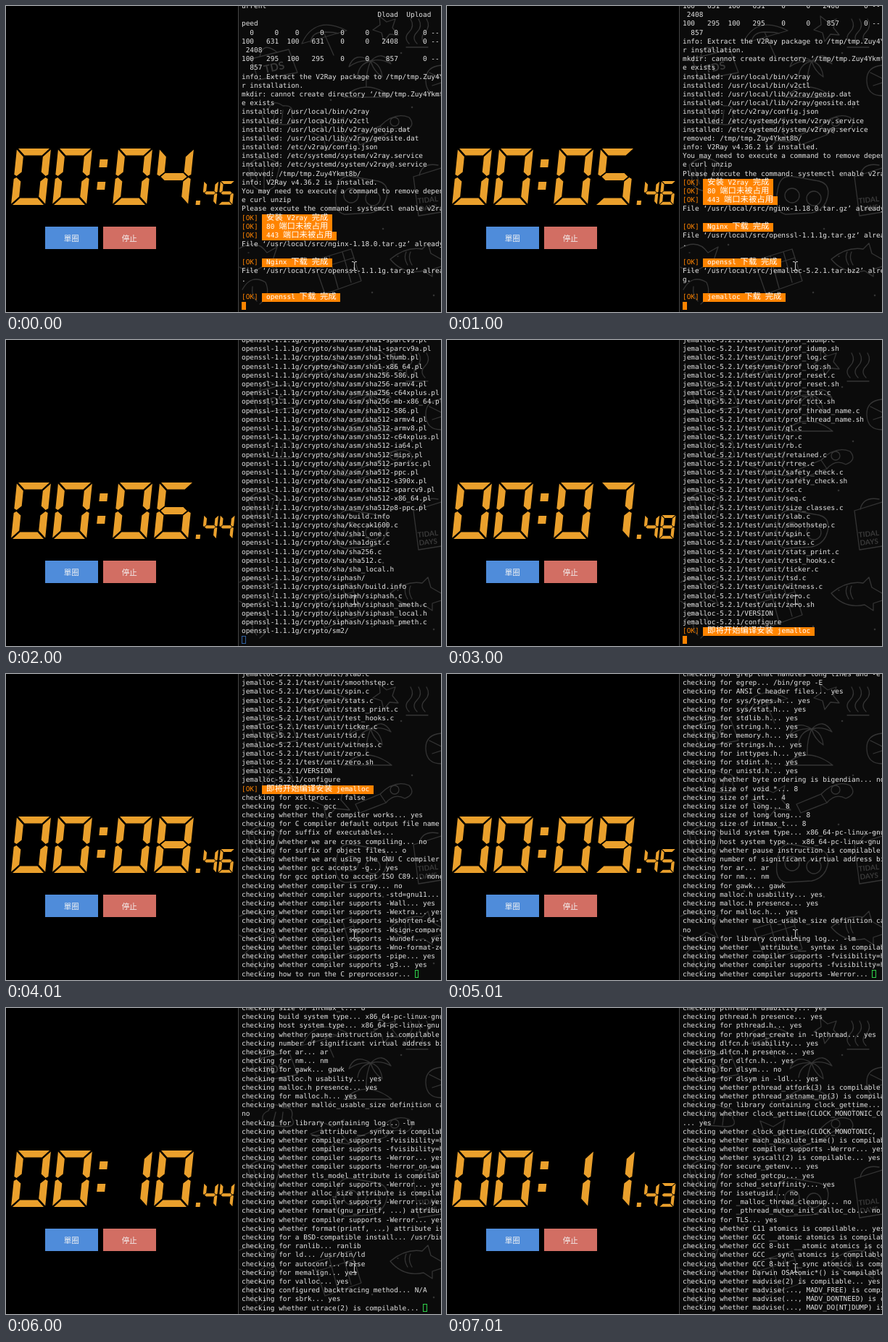
These frames come from a looping animation (600x423 px, 8 s). An HTML page:

```html
<!DOCTYPE html>
<html lang="zh">
<head>
<meta charset="utf-8">
<title>Stopwatch and terminal</title>
<style>
html, body { margin: 0; width: 100%; height: 100%; overflow: hidden; background: #000; }
svg { position: absolute; left: 0; top: 0; }
button {
  position: absolute; top: 305px; width: 73.5px; height: 31px; padding: 0; border: 0;
  color: #f4f4f4; font: 10.5px "Noto Sans CJK TC", "Noto Sans CJK", sans-serif;
}
#lap { left: 53.5px; background: #4f8cda; }
#stop { left: 133.5px; background: #d26e63; }
pre {
  position: absolute; left: 325px; top: -4.9px; margin: 0; width: 275px; height: 428px; overflow: hidden;
  color: #e4e4e4; font: 9.45px/12.18px "DejaVu Sans Mono", monospace;
  text-rendering: geometricPrecision; font-variant-ligatures: none;
}
pre em { color: #ff8400; font-style: normal; }
pre b { display: inline-block; height: 12.18px; background: #ff8400; color: #fff; font-weight: 400; }
pre i { font: 11.38px/0 "Noto Sans CJK SC", "Noto Sans CJK", sans-serif; }
pre u { display: inline-block; box-sizing: border-box; width: 5.7px; height: 11px; border: 1px solid; vertical-align: -2px; }
</style>
</head>
<body>
<svg width="600" height="423">
  <path fill="#0b0b0b" d="M321 0h279v423H321z"/>
  <path stroke="#444" d="M320.5 0v423"/>
  <g id="doodles" fill="none" stroke="#343434" stroke-width="1.3" stroke-linejoin="round" stroke-linecap="round">
    <!-- bag, palm island, steam, coconut -->
    <path d="M338 73l52-13 12 32-54 10zM350 70q4-22 24-6"/>
    <path d="M466 126q30-28 66 0zM497 112q-1-20 6-36M503 76q-22-14-30 8 14-10 30-8 16-16 28 4-14-8-28-4 14 4 16 22-12-8-16-22-16 4-18 20"/>
    <path d="M556 52q-8-8 0-16t2-18M567 52q-8-8 0-16t2-18M578 52q-8-8 0-16t2-18M552 57h30"/>
    <path d="M600 82q-22 2-21 22t21 20M584 92l16 8M588 110l12-4"/>
    <!-- umbrella, shell, snorkel -->
    <path d="M408 52q18-40 62-18zM438 36l14 32M420 50q2-14 18-14t20 2"/>
    <path d="M358 162q-10-14 4-20 6-14 20-4 16-2 12 14 8 12-10 12zM368 160l4-16M380 162l2-18"/>
    <path d="M482 180l34-14 8 12-36 14zM516 166q20-20 40-12 10 12-6 18-14-8-26 6M530 160a6 6 0 1 0 12 0a6 6 0 1 0-12 0"/>
    <path d="M432 156l18 8 16-10-4 20 12 14-20-2-12 14-4-18-18-8 16-6z"/>
    <!-- goggles, sign, cooler -->
    <path d="M457 250q4-18 22-14l34 6q16 4 12 22t-22 22l-36 2q-18-4-10-38zM466 262a10 10 0 1 0 20 0a10 10 0 1 0-20 0M496 266a10 10 0 1 0 20 0a10 10 0 1 0-20 0"/>
    <path d="M562 236l38-12M562 236l7 54 31-5M570 234q4-18 26-14"/>
    <path d="M424 352l52-16 14 44-50 18zM428 364l52-16M446 346l12 44M464 340l12 42"/>
    <!-- sharks and fish -->
    <path d="M530 350q22-18 44-14l8-8 4 14 14 8M530 350q18 22 46 16l12 8v-10l12-4M540 346h1M552 340q-4 8 2 18M558 340q-4 8 2 18"/>
    <path d="M322 335q24-14 38 6l14-8-6 18 6 14-16-8q-18 16-36 4M334 341h1"/>
    <path d="M326 392q12-22 32-10 8 18-8 30M340 388q-2 12 6 20"/>
    <path d="M334 220q20-20 44 0l-8 30q-16 12-30-2zM342 224l6 22M356 218v34M369 222l-6 24"/>
    <path d="M515 14l10 8 12-4-4 12 8 10-12-1-8 10-3-12-12-4 10-7z"/>
    <path stroke-width="2.5" d="M410 98h.1M448 130h.1M545 65h.1M560 140h.1M402 208h.1M540 208h.1M410 300h.1M520 308h.1M505 396h.1M388 330h.1M590 400h.1M340 128h.1"/>
    <g fill="#3a3a3a" stroke="none" font-family="Lato, sans-serif" font-weight="700">
      <text font-size="15" transform="translate(357 93) rotate(-13)">TDS</text>
      <text font-size="10" transform="translate(568 273) rotate(-6)">TIDAL</text>
      <text font-size="10" transform="translate(570 284) rotate(-6)">DAYS</text>
    </g>
  </g>
  <path id="clock" fill="#eaa02c"/>
</svg>
<button id="lap">單圈</button>
<button id="stop">停止</button>
<pre id="term"></pre>
<svg width="600" height="423"><path fill="none" stroke="#ccc" d="M477 353.500h2l1.500 1 1.500-1h2M480.500 354v11M477 365.500h2l1.500-1 1.500 1h2"/></svg>
<script>
const starts = [0, 1000, 2000, 3000, 4010, 5010, 6000, 7010], loop = 8000;
const readings = ['000445', '000546', '000644', '000748', '000846', '000945', '001044', '001143'];

// Terminal: a growing log, of which each screen shows the last rows.
const log = [], screens = [];
const cursor = (color, fill = 'none') => `<u style="border-color:${color};background:${fill}"></u>`;
const block = cursor('#ff8400', '#ff8400'), green = cursor('#2fd04a');
const add = text => log.push(...text.replaceAll('~', 'checking ').split('\n'));
const files = (prefix, names) => log.push(...names.split(' ').map(n => prefix + n));
const ok = text => add(`<em>[OK]</em> <b> ${text.replace(/[\u4e00-\u9fff]+/g, '<i>$&</i>')} </b>`);
const show = last => screens.push([...log.slice(-34), last.replace('~', 'checking ')].join('\n'));

add(`urrent
                                 Dload  Upload
peed
  0     0    0     0    0     0      0      0 --
100   631  100   631    0     0   2408      0 --
 2408
100   295  100   295    0     0    857      0 --
  857
info: Extract the V2Ray package to /tmp/tmp.Zuy4Ykmt8b
r installation.
mkdir: cannot create directory ‘/tmp/tmp.Zuy4Ykmt8b
e exists
installed: /usr/local/bin/v2ray
installed: /usr/local/bin/v2ctl
installed: /usr/local/lib/v2ray/geoip.dat
installed: /usr/local/lib/v2ray/geosite.dat
installed: /etc/v2ray/config.json
installed: /etc/systemd/system/v2ray.service
installed: /etc/systemd/system/v2ray@.service
removed: /tmp/tmp.Zuy4Ykmt8b/
info: V2Ray v4.36.2 is installed.
You may need to execute a command to remove dependent
e curl unzip
Please execute the command: systemctl enable v2ray`);
ok('安装 V2ray 完成');
ok('80 端口未被占用');
ok('443 端口未被占用');
add('File ‘/usr/local/src/nginx-1.18.0.tar.gz’ already\n');
ok('Nginx 下载 完成');
add('File ‘/usr/local/src/openssl-1.1.1g.tar.gz’ already\n.\n');
ok('openssl 下载 完成');
show(block);

add('File ‘/usr/local/src/jemalloc-5.2.1.tar.bz2’ already\ng.\n');
ok('jemalloc 下载 完成');
show(block);

const crypto = 'openssl-1.1.1g/crypto/';
files(crypto + 'sha/asm/sha', '1-sparcv9.pl 1-sparcv9a.pl 1-thumb.pl 1-x86_64.pl 256-586.pl 256-armv4.pl 256-c64xplus.pl 256-mb-x86_64.pl 512-586.pl 512-armv4.pl 512-armv8.pl 512-c64xplus.pl 512-ia64.pl 512-mips.pl 512-parisc.pl 512-ppc.pl 512-s390x.pl 512-sparcv9.pl 512-x86_64.pl 512p8-ppc.pl');
files(crypto + 'sha/', 'build.info keccak1600.c sha1_one.c sha1dgst.c sha256.c sha512.c sha_local.h');
files(crypto + 'siphash/', ' build.info siphash.c siphash_ameth.c siphash_local.h siphash_pmeth.c');
add(crypto + 'sm2/');
show(cursor('#2f5f9f'));

const jemalloc = 'jemalloc-5.2.1/';
files(jemalloc + 'test/unit/', 'prof_idump.c prof_idump.sh prof_log.c prof_log.sh prof_reset.c prof_reset.sh prof_tctx.c prof_tctx.sh prof_thread_name.c prof_thread_name.sh ql.c qr.c rb.c retained.c rtree.c safety_check.c safety_check.sh sc.c seq.c size_classes.c slab.c smoothstep.c spin.c stats.c stats_print.c test_hooks.c ticker.c tsd.c witness.c zero.c zero.sh');
files(jemalloc, 'VERSION configure');
ok('即将开始编译安装 jemalloc');
show(block);

add(`~for xsltproc... false
~for gcc... gcc
~whether the C compiler works... yes
~for C compiler default output file name... a.out
~for suffix of executables... 
~whether we are cross compiling... no
~for suffix of object files... o
~whether we are using the GNU C compiler... yes
~whether gcc accepts -g... yes
~for gcc option to accept ISO C89... none needed
~whether compiler is cray... no
~whether compiler supports -std=gnu11... yes
~whether compiler supports -Wall... yes
~whether compiler supports -Wextra... yes
~whether compiler supports -Wshorten-64-to-32... no
~whether compiler supports -Wsign-compare... yes
~whether compiler supports -Wundef... yes
~whether compiler supports -Wno-format-zero-length
~whether compiler supports -pipe... yes
~whether compiler supports -g3... yes`);
show('~how to run the C preprocessor... ' + green);

add(`~for grep that handles long lines and -e... /bin
~for egrep... /bin/grep -E
~for ANSI C header files... yes
~for sys/types.h... yes
~for sys/stat.h... yes
~for stdlib.h... yes
~for string.h... yes
~for memory.h... yes
~for strings.h... yes
~for inttypes.h... yes
~for stdint.h... yes
~for unistd.h... yes
~whether byte ordering is bigendian... no
~size of void *... 8
~size of int... 4
~size of long... 8
~size of long long... 8
~size of intmax_t... 8
~build system type... x86_64-pc-linux-gnu
~host system type... x86_64-pc-linux-gnu
~whether pause instruction is compilable...
~number of significant virtual address bits...
~for ar... ar
~for nm... nm
~for gawk... gawk
~malloc.h usability... yes
~malloc.h presence... yes
~for malloc.h... yes
~whether malloc_usable_size definition can use
no
~for library containing log... -lm
~whether __attribute__ syntax is compilable...
~whether compiler supports -fvisibility=hidden
~whether compiler supports -fvisibility=hidden`);
show('~whether compiler supports -Werror... ' + green);

add(`~whether compiler supports -Werror... yes
~whether compiler supports -herror_on_warning... no
~whether tls_model attribute is compilable... yes
~whether compiler supports -Werror... yes
~whether alloc_size attribute is compilable... yes
~whether compiler supports -Werror... yes
~whether format(gnu_printf, ...) attribute is
~whether compiler supports -Werror... yes
~whether format(printf, ...) attribute is comp
~for a BSD-compatible install... /usr/bin/install
~for ranlib... ranlib
~for ld... /usr/bin/ld
~for autoconf... false
~for memalign... yes
~for valloc... yes
~configured backtracing method... N/A
~for sbrk... yes`);
show('~whether utrace(2) is compilable... ' + green);

add(`~whether utrace(2) is compilable... no
~whether a program using __builtin_ffsl is comp
~LG_PAGE... 12
~pthread.h usability... yes
~pthread.h presence... yes
~for pthread.h... yes
~for pthread_create in -lpthread... yes
~dlfcn.h usability... yes
~dlfcn.h presence... yes
~for dlfcn.h... yes
~for dlsym... no
~for dlsym in -ldl... yes
~whether pthread_atfork(3) is compilable... yes
~whether pthread_setname_np(3) is compilable...
~for library containing clock_gettime... none
~whether clock_gettime(CLOCK_MONOTONIC_COARSE,
... yes
~whether clock_gettime(CLOCK_MONOTONIC, ...) is
~whether mach_absolute_time() is compilable... no
~whether compiler supports -Werror... yes
~whether syscall(2) is compilable... yes
~for secure_getenv... yes
~for sched_getcpu... yes
~for sched_setaffinity... yes
~for issetugid... no
~for _malloc_thread_cleanup... no
~for _pthread_mutex_init_calloc_cb... no
~for TLS... yes
~whether C11 atomics is compilable... yes
~whether GCC __atomic atomics is compilable... yes
~whether GCC 8-bit __atomic atomics is compilable
~whether GCC __sync atomics is compilable... yes
~whether GCC 8-bit __sync atomics is compilable
~whether Darwin OSAtomic*() is compilable... no
~whether madvise(2) is compilable... yes
~whether madvise(..., MADV_FREE) is compilable
~whether madvise(..., MADV_DONTNEED) is compilable`);
show('~whether madvise(..., MADV_DO[NT]DUMP) is compilable');

// Stopwatch: slanted seven-segment digits.
const W = 47, H = 78, slant = 0.103;
const flipX = p => p.map(([x, y]) => [W - x, y]);
const flipY = p => p.map(([x, y]) => [x, H - y]);
const a = [[2, 0], [45, 0], [35.5, 9.5], [11.5, 9.5]];
const f = [[0, 1.5], [10, 11.5], [10, 32.5], [3.5, 38], [0, 36]];
const g = [[5.5, 39], [11, 34], [36, 34], [41.5, 39], [36, 44], [11, 44]];
const segments = { a, b: flipX(f), c: flipX(flipY(f)), d: flipY(a), e: flipY(f), f, g };
const shapes = ['abcdef', 'bc', 'abdeg', 'abcdg', 'bcfg', 'acdfg', 'acdefg', 'abc', 'abcdefg', 'abcdfg'];
const places = [[7, 197, 1], [64, 197, 1], [147, 197, 1], [204, 197, 1], [270, 242, 0.42], [292.5, 242, 0.42]];

const poly = (points, x0, y0, s) =>
  'M' + points.map(([x, y]) => [x0 + s * (x + (H - y) * slant), y0 + s * y]).join('L') + 'Z';
const square = (x, y, n) => [[x, y], [x + n, y], [x + n, y + n], [x, y + n]];
const dots = [[0, 15, 11], [0, 46, 11]].map(q => poly(square(...q), 123, 197, 1)).join('')
  + poly(square(0, 72, 6), 261.500, 197, 1);
const clockPath = digits => dots + [...digits].map((n, i) =>
  [...shapes[n]].map(k => poly(segments[k], ...places[i])).join('')).join('');

const clock = document.getElementById('clock'), term = document.getElementById('term');
let current = -1;
function frame() {
  const t = performance.now() % loop;
  const i = starts.findLastIndex(s => s <= t);
  if (i !== current) {
    current = i;
    clock.setAttribute('d', clockPath(readings[i]));
    term.innerHTML = screens[i];
  }
  requestAnimationFrame(frame);
}
frame();
</script>
</body>
</html>
```
